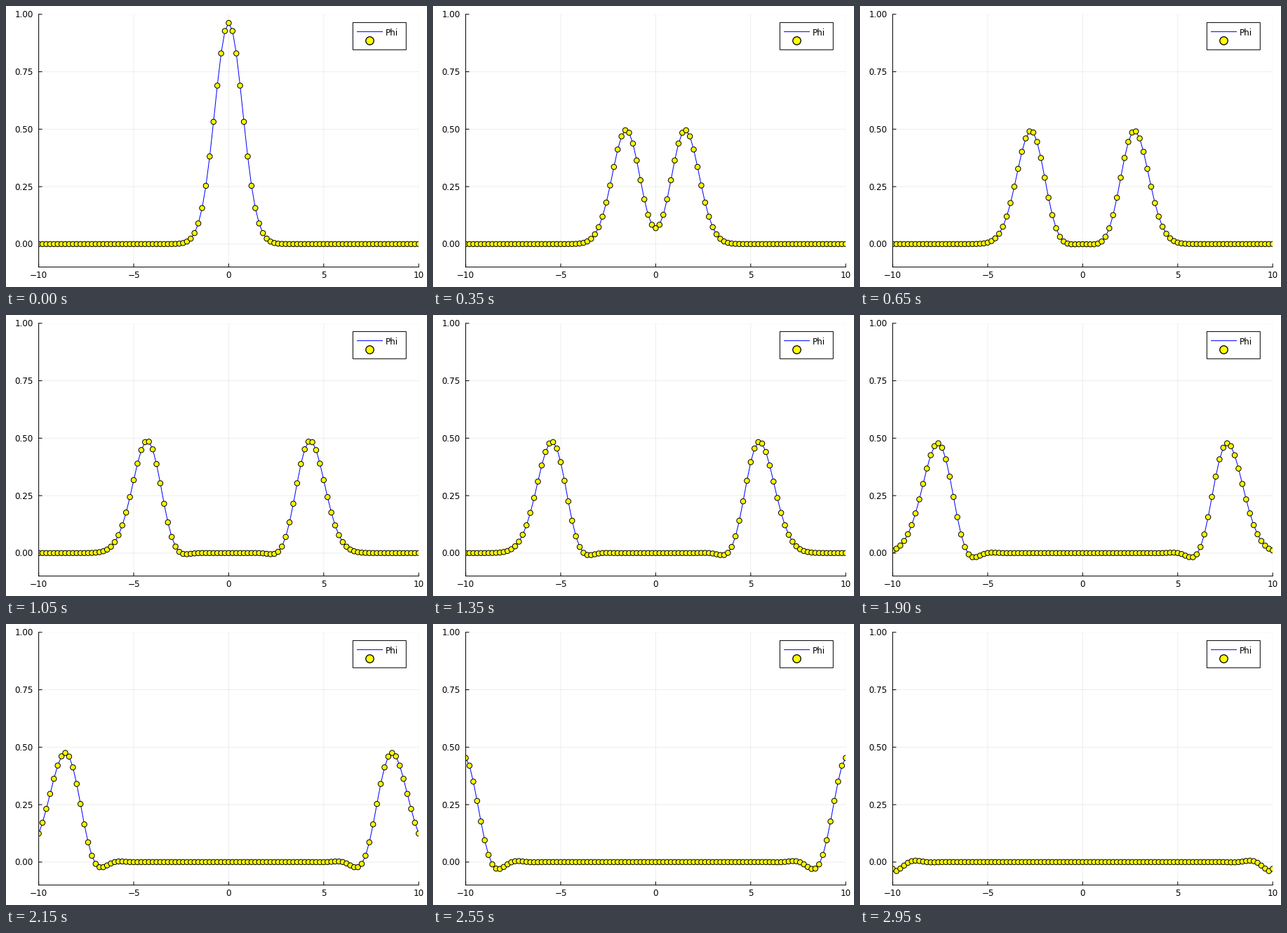
Recreate the animation shown at these times as a matplotlib script. Size 600 by 400 pixels, loop 3000 ms.

```python
import numpy as np
import matplotlib.pyplot as plt
from matplotlib.animation import FuncAnimation
from matplotlib.patches import Rectangle
from matplotlib.transforms import ScaledTranslation

W, H, DPI = 600, 400, 100
PX = 72 / DPI  # one pixel in points
LEFT, RIGHT, TOP, BOTTOM = 46.6, 588.2, 11.8, 371.6
FRAMES, STEPS = 60, 2
NU = 0.5  # Courant number
TICK = 5  # tick length in pixels

plt.rcParams.update({"font.family": "DejaVu Sans", "font.size": 12 * PX})

x = np.linspace(-10, 10, 101)


def advance(r):
    """One Lax-Wendroff step of the right-moving half, upwind at the exit."""
    new = np.zeros_like(r)
    ahead, here, behind = r[2:], r[1:-1], r[:-2]
    new[1:-1] = (here - NU / 2 * (ahead - behind)
                 + NU ** 2 / 2 * (ahead - 2 * here + behind))
    new[-1] = r[-1] - NU * (r[-1] - r[-2])
    return new


def solve():
    """Field at every frame; the left-moving half mirrors the right one."""
    r = np.exp(-x ** 2) / 2
    fields = []
    for _ in range(FRAMES):
        for _ in range(STEPS):
            r = advance(r)
        fields.append(r + r[::-1])
    return fields


fields = solve()
width, height = RIGHT - LEFT, BOTTOM - TOP
xticks, yticks = np.linspace(-10, 10, 5), np.linspace(0, 1, 5)

fig = plt.figure(figsize=(W / DPI, H / DPI), dpi=DPI, facecolor="white")
ax = fig.add_axes([LEFT / W, 1 - BOTTOM / H, width / W, height / H])
ax.set(xlim=(-10, 10), ylim=(-0.1, 1), xticks=xticks, yticks=yticks)
ax.xaxis.set_major_formatter("{x:.0f}")
ax.yaxis.set_major_formatter("{x:.2f}")
ax.set_axisbelow(True)
ax.grid(color="black", alpha=0.07, lw=PX, snap=False)
ax.spines[["top", "right"]].set_visible(False)
ax.spines[["left", "bottom"]].set(linewidth=PX, snap=False)
ax.tick_params(length=0)
ax.tick_params(axis="x", pad=5.5 * PX)
ax.tick_params(axis="y", pad=8 * PX)

# inward ticks, free of pixel snapping
style = dict(color="black", lw=PX, snap=False, clip_on=False)
ax.vlines(xticks, 0, TICK / height, transform=ax.get_xaxis_transform(), **style)
ax.hlines(yticks, 0, TICK / width, transform=ax.get_yaxis_transform(), **style)

lift = ScaledTranslation(0, 0.45 / DPI, fig.dpi_scale_trans)
for label in ax.get_yticklabels():
    label.set_transform(label.get_transform() + lift)


def dots(axes, xs, ys, size, edge):
    # a colour per dot keeps sub-pixel placement
    return axes.scatter(xs, ys, s=(size * PX) ** 2, c=["yellow"] * len(xs),
                        edgecolors=["black"] * len(xs),
                        linewidths=edge * PX, zorder=2.2)


curve, = ax.plot(x, fields[0], color="blue", lw=PX, zorder=2.1)
points = dots(ax, x, fields[0], 7.4, 1)

# legend, laid out in pixels
key = fig.add_axes([0, 0, 1, 1])
key.set(xlim=(0, W), ylim=(H, 0))
key.axis("off")
key.add_patch(Rectangle((494.4, 23.6), 75.9, 38.7, fc="white", ec="black",
                        lw=PX, snap=False))
key.plot([500.5, 536.5], [36.6, 36.6], color="blue", lw=PX, snap=False)
dots(key, [518.4], [49.2], 11.4, 1.3)
key.text(541, 36.7, "Phi", va="center_baseline")


def draw(i):
    curve.set_ydata(fields[i])
    points.set_offsets(np.column_stack([x, fields[i]]))
    return curve, points


anim = FuncAnimation(fig, draw, frames=FRAMES, interval=50,
                     repeat=True, repeat_delay=0)
plt.show()
```
